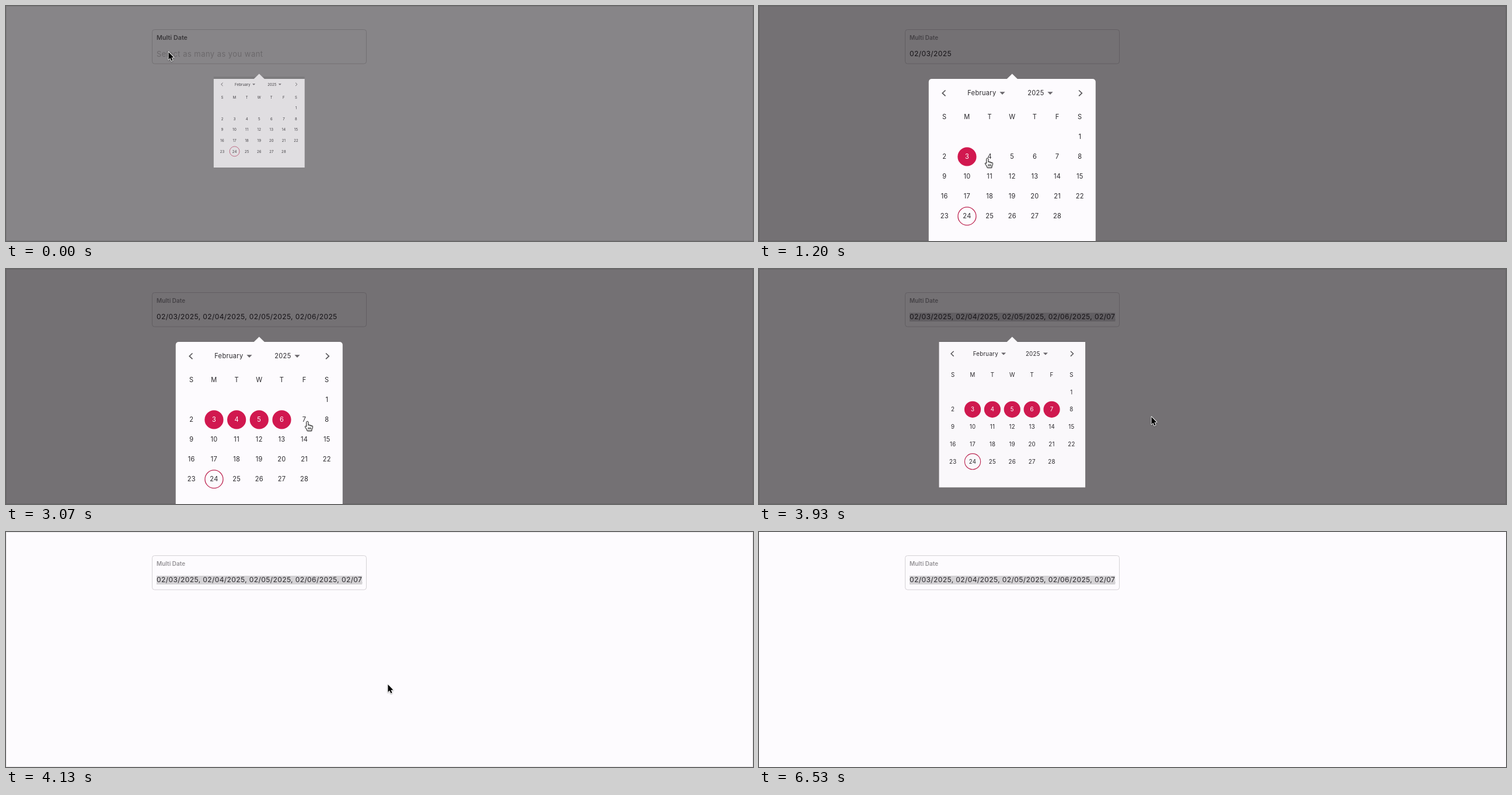
An HTML page with a canvas for the animation above (6.6 s loop, 1280 by 403 pixels).

```html
<!DOCTYPE html>
<html lang="en">
<head>
<meta charset="utf-8">
<title>Multi date picker</title>
<style>
html, body { margin: 0; width: 100%; height: 100%; overflow: hidden; background: #fdfbfe; }
canvas { display: block; width: 1280px; height: 403px; }
</style>
</head>
<body>
<canvas id="stage"></canvas>
<script>
const W = 1280, H = 403;
const STEPS = 99, STEP = 200 / 3;      // the picture advances 15 times a second
const CLOSE = 59, HIDE = 98;           // steps: popup starts closing, cursor leaves
const FONT = 'Inter, "Open Sans", sans-serif';
const PAPER = '#fdfbfe', INK = '#2a282c', RED = '#d1184f';
const AX = 433.8, AY = 116.3;          // popup scales from its pointer tip
const PANEL = 286, PITCH = 38.67, ROW = 34, CLIP_Y = 125;

const dpr = window.devicePixelRatio || 1;
const stage = document.getElementById('stage');
const layer = document.createElement('canvas');
const ctx = setup(stage), pop = setup(layer);

function setup(canvas) {
  canvas.width = W * dpr;
  canvas.height = H * dpr;
  const c = canvas.getContext('2d');
  c.scale(dpr, dpr);
  return c;
}

const clamp = u => Math.min(1, Math.max(0, u));
const smooth = u => u * u * (3 - 2 * u);
const colX = i => AX + PITCH * (i - 3);

// Clicks on the days 3 to 7 come a little faster each time
const clicks = Array.from({ length: 5 }, (_, i) => Math.floor(12 + 11.75 * i - 0.625 * i * i));

// Each move eases to (x, y) between two steps; sag bends it downwards
const moves = [
  ...clicks.map((_, i) => ({
    from: i ? clicks[i - 1] : 0,
    to: i ? clicks[i] - 3 : 11,
    x: 358 + 39.6 * i,
    y: i ? 261 : 259
  })),
  { from: clicks[4], to: 54, x: 672, y: 253, sag: 27 },
  { from: CLOSE, to: 60, x: 654, y: 261 },
  { from: 62, to: 65, x: 711, y: 257 },
  { from: 66, to: 71, x: 688, y: 251 },
  { from: 84, to: 86, x: 688, y: 236 }
];

function cursorAt(k) {
  let x = 278, y = 78.5;
  for (const m of moves) {
    const e = smooth(clamp((k - m.from) / (m.to - m.from)));
    x += (m.x - x) * e;
    y += (m.y - y) * e + (m.sag || 0) * Math.sin(Math.PI * e);
  }
  return [x, y];
}

function popupScale(k) {
  return smooth(clamp(Math.min(0.53 + 0.25 * k, 0.78 - 0.25 * (k - CLOSE))));
}

function text(c, str, x, y, size, color, spacing = 0, weight = 400, align = 'left') {
  c.font = `${weight} ${size}px ${FONT}`;
  c.letterSpacing = spacing + 'px';
  c.textAlign = align;
  c.fillStyle = color;
  c.fillText(str, x, y);
}

function poly(c, points) {
  c.beginPath();
  points.forEach(([x, y]) => c.lineTo(x, y));
}

function drawField(count, selected) {
  ctx.strokeStyle = '#d5d2d6';
  ctx.lineWidth = 1;
  ctx.beginPath();
  ctx.roundRect(250.5, 40.5, 367, 58.5, 4);
  ctx.stroke();
  if (!count) {
    text(ctx, 'Multi Date', 258, 58.4, 10.8, '#69676b', 0, 600);
    text(ctx, 'Select as many as you want', 258, 87, 13, '#c6c3c7', 0.45);
    return;
  }
  text(ctx, 'Multi Date', 258, 58.2, 10, '#949195', 0, 600);
  ctx.save();
  ctx.beginPath();
  ctx.rect(258, 70, 352.5, 25);
  ctx.clip();
  if (selected) {
    ctx.fillStyle = '#d4d2d5';
    ctx.fillRect(258, 75, 352.5, 15);
  }
  const dates = Array.from({ length: count }, (_, i) => `02/0${i + 3}/2025`);
  text(ctx, dates.join(', '), 258, 86, 12.14, INK, 0.34);
  ctx.restore();
}

function chevron(x, dir) {
  poly(pop, [[x - 2.7 * dir, 144.5], [x + 2.5 * dir, 149.4], [x - 2.7 * dir, 154.3]]);
  pop.strokeStyle = '#59575b';
  pop.lineWidth = 1.7;
  pop.stroke();
}

function menu(str, x, caretX) {
  text(pop, str, x, 153.4, 11.1, INK, 0.3);
  poly(pop, [[caretX - 4.6, 147.3], [caretX + 4.6, 147.3], [caretX, 151.9]]);
  pop.fillStyle = '#69666b';
  pop.fill();
}

function cell(str, x, y, color = INK) {
  text(pop, str, x, y + 4, 11.1, color, 0.3, 400, 'center');
}

function drawCalendar(count) {
  chevron(316.8, -1);
  chevron(550.8, 1);
  menu('February', 357.2, 417);
  menu('2025', 460.2, 499);

  [...'SMTWTFS'].forEach((d, i) => cell(d, colX(i), 190.4));
  for (let day = 1; day <= 28; day++) {
    const slot = day + 5;
    const x = colX(slot % 7), y = 224.4 + ROW * Math.floor(slot / 7);
    const on = day >= 3 && day < 3 + count;
    pop.beginPath();
    if (on) {
      pop.arc(x, y, 16.1, 0, 7);
      pop.fillStyle = RED;
      pop.fill();
    } else if (day === 24) {
      pop.arc(x, y, 15.5, 0, 7);
      pop.strokeStyle = '#bd2753';
      pop.lineWidth = 1.3;
      pop.stroke();
    }
    cell(String(day), x, y, on ? '#fff' : INK);
  }
}

function drawPopup(s, count) {
  pop.clearRect(0, 0, W, H);
  const left = AX - PANEL / 2 * s, top = AY + 8.7 * s, size = PANEL * s;
  pop.fillStyle = 'rgba(0,0,0,.1)';
  pop.fillRect(left, top, size, CLIP_Y - top);

  pop.save();
  pop.beginPath();
  pop.rect(0, CLIP_Y, W, H);
  pop.clip();
  pop.fillStyle = PAPER;
  pop.beginPath();
  pop.roundRect(left, top, size, size, s === 1 ? 5 : 0);
  pop.fill();
  pop.translate(AX, AY);
  pop.scale(s, s);
  pop.translate(-AX, -AY);
  drawCalendar(count);
  pop.restore();

  poly(pop, [[AX, AY], [AX + 9.5, CLIP_Y + 0.5], [AX - 9.5, CLIP_Y + 0.5]]);
  pop.fillStyle = PAPER;
  pop.fill();

  ctx.globalAlpha = Math.sin(s * Math.PI / 2);
  ctx.drawImage(layer, 0, 0, W, H);
  ctx.globalAlpha = 1;
}

function withShadow(paint) {
  ctx.save();
  ctx.shadowColor = 'rgba(0,0,0,.35)';
  ctx.shadowBlur = 2 * dpr;
  ctx.shadowOffsetY = dpr;
  paint();
  ctx.restore();
}

function drawArrow() {
  poly(ctx, [[0.5, 0.5], [0.5, 13.4], [3.4, 10.7], [5.4, 15.6], [7.6, 14.7], [5.6, 9.9], [9.4, 9.7]]);
  ctx.closePath();
  ctx.lineWidth = 1.8;
  ctx.strokeStyle = '#fff';
  withShadow(() => ctx.stroke());
  ctx.fillStyle = '#000';
  ctx.fill();
}

function drawHand() {
  ctx.beginPath();
  ctx.moveTo(-1.6, 9.4);
  ctx.arc(0, 1.8, 1.6, Math.PI, 0);                                    // index finger
  for (let i = 0; i < 3; i++) ctx.arc(3 + 2.4 * i, 7.4 + 0.8 * i, 1.3, Math.PI, 0);
  ctx.quadraticCurveTo(9.2, 12, 7.5, 14.3);
  ctx.lineTo(7.5, 16.5);
  ctx.lineTo(-0.2, 16.5);
  ctx.quadraticCurveTo(-0.6, 14, -4.1, 9.4);
  ctx.quadraticCurveTo(-3.6, 7.2, -1.6, 9.4);                          // thumb
  ctx.closePath();
  ctx.fillStyle = '#fff';
  withShadow(() => ctx.fill());
  ctx.strokeStyle = '#111';
  ctx.lineWidth = 1;
  ctx.stroke();
  for (let i = 0; i < 3; i++) {
    const x = 1.6 + 2.1 * i;
    poly(ctx, [[x, 10.6], [x, 14.2]]);
    ctx.stroke();
  }
}

function drawCursor(k, open) {
  const [x, y] = cursorAt(k);
  const overDays = open && Math.abs(x - AX) < 135 && y > 240;
  ctx.save();
  ctx.translate(x, y);
  ctx.lineJoin = 'round';
  overDays ? drawHand() : drawArrow();
  ctx.restore();
}

function draw(k) {
  const count = clicks.filter(c => k >= c).length;
  const s = popupScale(k);
  ctx.fillStyle = PAPER;
  ctx.fillRect(0, 0, W, H);
  if (k < HIDE) {
    ctx.strokeStyle = '#e6e4e7';
    ctx.lineWidth = 1;
    ctx.strokeRect(0.5, 0.5, W - 1, H - 1);
  }
  drawField(count, k >= CLOSE);
  if (s > 0.01) {
    ctx.fillStyle = `rgba(4,0,4,${0.55 * Math.min(1, 1.57 * s)})`;
    ctx.fillRect(0, 0, W, H);
    drawPopup(s, count);
  }
  if (k < HIDE) drawCursor(k, s === 1);
}

const start = performance.now();
function tick() {
  const t = performance.now() - start + 4;
  draw(Math.floor(Math.max(0, t) / STEP) % STEPS);
  requestAnimationFrame(tick);
}
tick();
</script>
</body>
</html>
```
